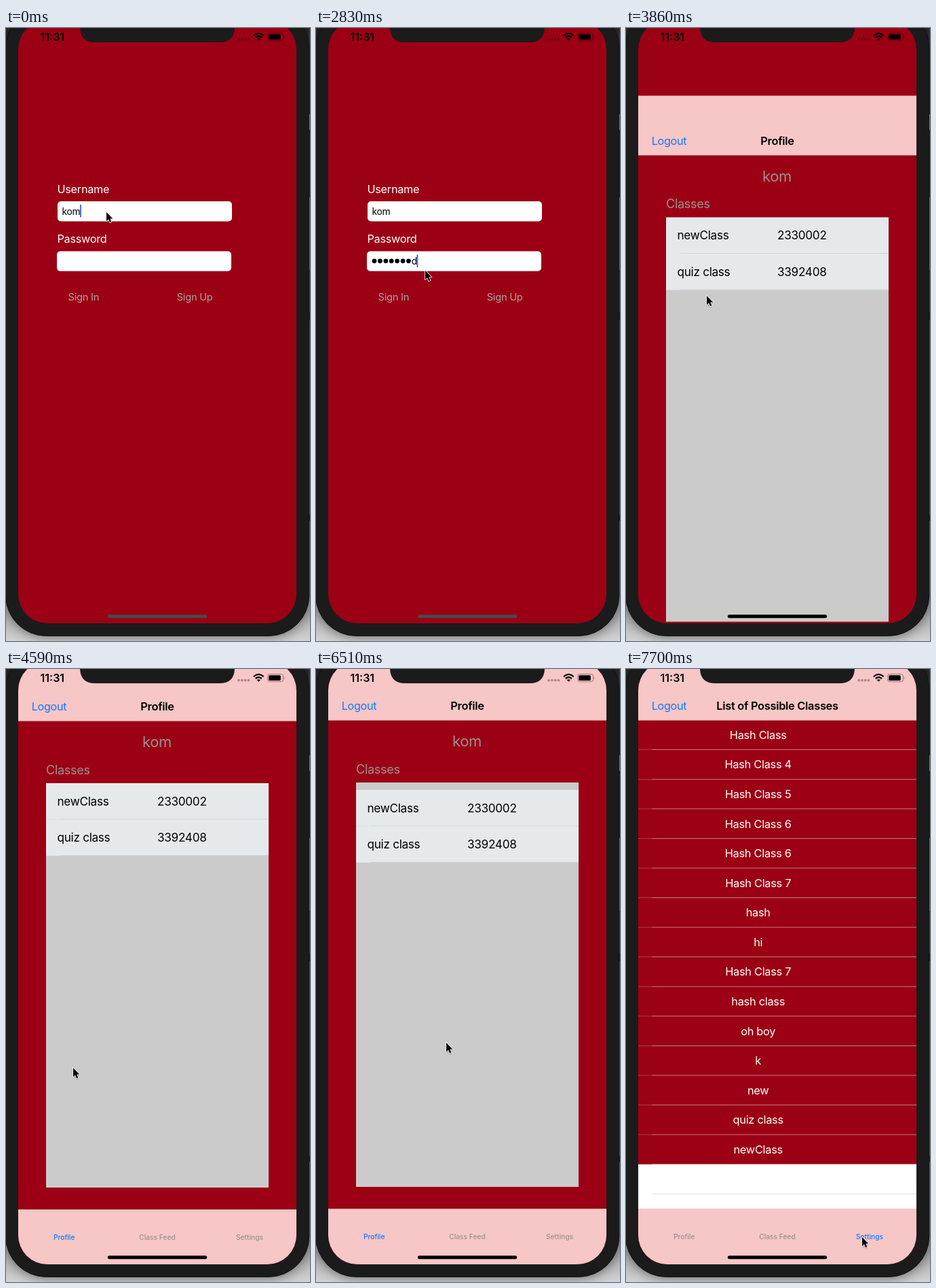
An HTML page for the animation above (8 s loop, 448 px wide and 902 px high).

```html
<!DOCTYPE html>
<html lang="en">
<head>
<meta charset="utf-8">
<title>Sign-in walkthrough</title>
<style>
html, body { margin: 0; width: 100%; height: 100%; overflow: hidden; background: #2b2b2b; }
svg { display: block; width: 100vw; height: 100vh; }
text { font-family: Inter, "Liberation Sans", sans-serif; letter-spacing: -.018em; white-space: pre; }
.label { font-size: 16.3px; fill: #fff; }
.button { font-size: 14.7px; fill: #ada3a4; }
.field { font-size: 13.8px; fill: #000; }
.link { font-size: 16.2px; fill: #0b7bff; }
.title { font-size: 16.4px; font-weight: 600; text-anchor: middle; }
.name { font-size: 22px; fill: #9a9091; text-anchor: middle; }
.head { font-size: 18.1px; fill: #9a9091; }
.cell { font-size: 17.2px; }
.row { font-size: 16.4px; fill: #fff; text-anchor: middle; }
.tab { font-size: 10.2px; font-weight: 500; fill: #9c9091; letter-spacing: 0; text-anchor: middle; }
.tab.on { fill: #0b7bff; }
.clock { font-size: 16px; font-weight: 600; letter-spacing: 0; }
</style>
</head>
<body>
<svg viewBox="0 0 448 902" xmlns="http://www.w3.org/2000/svg">
  <defs>
    <linearGradient id="desk" x1="0" y1="0" x2="0" y2="1">
      <stop offset="0" stop-color="#2b2b2b"/><stop offset=".8" stop-color="#3a3a3a"/>
      <stop offset=".93" stop-color="#9a9a9a"/><stop offset="1" stop-color="#d2d2d2"/>
    </linearGradient>
    <filter id="blur" x="-20%" y="-20%" width="140%" height="140%"><feGaussianBlur stdDeviation="9"/></filter>
    <filter id="soft" x="-60%" y="-60%" width="220%" height="220%"><feGaussianBlur stdDeviation="1"/></filter>
    <clipPath id="screen"><rect x="18" y="-11.6" width="410" height="887.6" rx="43"/></clipPath>
    <clipPath id="tableBox"><rect x="59" y="167" width="328" height="595"/></clipPath>
    <path id="arrow" d="M0 0V13.2L3 10.4L5.1 15.3L7.4 14.3L5.3 9.5H9.4Z"/>
  </defs>

  <rect width="448" height="902" fill="url(#desk)"/>
  <rect x="0" y="-30" width="447" height="926" rx="60" opacity=".5" filter="url(#blur)"/>
  <g id="edge"></g>
  <rect x="-.5" y="-30" width="447.3" height="924.5" rx="60" fill="#1b1b1b" stroke="#111"/>

  <g clip-path="url(#screen)">
    <rect x="18" y="-12" width="410" height="888" fill="#9b0014"/>
    <g id="login">
      <text class="label" x="75.5" y="242.5">Username</text>
      <rect x="76" y="255" width="257" height="29.5" rx="5" fill="#fff"/>
      <text class="field" id="user" x="82.5" y="274.5">kom</text>
      <text class="label" x="75.5" y="316">Password</text>
      <rect x="75" y="328.5" width="257" height="29.3" rx="5" fill="#fff"/>
      <g id="bullets"></g>
      <text class="field" id="lastChar" y="347.8"></text>
      <rect id="caret" width="1.8" height="18.5" fill="#3f60d8"/>
      <text class="button" x="91.5" y="401">Sign In</text>
      <text class="button" x="251.7" y="401">Sign Up</text>
    </g>
    <g id="sheet">
      <rect x="18" y="-12" width="410" height="900" fill="#9b0014"/>
      <g id="profile">
        <text class="name" x="222.5" y="114">kom</text>
        <text class="head" x="59" y="153.8">Classes</text>
        <rect x="59" y="167" width="328" height="595" fill="#cbcbcb"/>
        <g clip-path="url(#tableBox)"><g id="cells"></g></g>
      </g>
      <g id="list"></g>
      <rect x="18" y="-12" width="410" height="87.5" fill="#f7c6c6"/>
      <path d="M18 75.6H428" stroke="#c9a3a5" stroke-width=".6"/>
      <text class="link" x="37.7" y="60">Logout</text>
      <text class="title" id="title" x="223" y="60"></text>
      <rect x="18" y="794" width="410" height="94" fill="#f7c6c6"/>
      <path id="tabLine" d="M18 793.8H428" stroke="#7d1420" stroke-width=".8"/>
      <g id="tabs"></g>
    </g>
  </g>

  <path d="M103 -3Q109 -2 109 0Q110 21 131 21H315Q336 21 337 0Q337 -2 343 -3Z" fill="#1b1b1b"/>
  <text class="clock" x="50.5" y="18.7">11:31</text>
  <g id="signal" opacity=".3"></g>
  <g fill="none" stroke="#000" stroke-width="2.2">
    <path d="M364.9 11.3Q372.3 4.6 379.7 11.3"/>
    <path d="M367.7 14.2Q372.3 10.2 376.9 14.2"/>
  </g>
  <path d="M369.7 16.1Q372.3 14.2 374.9 16.1L372.3 18.8Z"/>
  <rect x="385.6" y="7.6" width="23" height="11" rx="3" fill="none" stroke="#000" stroke-opacity=".4"/>
  <rect x="387.2" y="9.2" width="17.6" height="7.8" rx="1.6"/>
  <path d="M409.8 11.2Q411.6 13.1 409.8 15Z" opacity=".45"/>
  <rect id="home" x="149.8" y="863.2" width="146.4" height="5" rx="2.5"/>

  <g id="cursor">
    <use href="#arrow" y="1.5" opacity=".45" filter="url(#soft)"/>
    <use href="#arrow" fill="#000" stroke="#fff" stroke-width="1.6" stroke-linejoin="round" paint-order="stroke"/>
  </g>
</svg>
<script>
const LOOP = 8000;
const $ = id => document.getElementById(id);
const atLeast = (low, v) => v < low ? low : v;
const move = (el, x, y) => el.setAttribute('transform', `translate(${x} ${y})`);
const show = (el, on) => el.setAttribute('visibility', on ? 'inherit' : 'hidden');
const rect = (x, y, w, h, fill) => `<rect x="${x}" y="${y}" width="${w}" height="${h}" fill="${fill}"/>`;
const label = (cls, x, y, s) => `<text class="${cls}" x="${x}" y="${y}">${s}</text>`;

// Slivers of the desktop window beside the phone: top, height, colour
$('edge').innerHTML = [
  [0, 127, '#303030'], [127, 23, '#a8a8a8'], [150, 99, '#333'], [249, 107, '#8a8a8a'],
  [356, 62, '#555'], [418, 12, '#2c2c2c'], [430, 286, '#666'], [716, 9, '#2e2e2e'], [725, 115, '#777']
].map(([y, h, c]) => rect(446, y, 2, h, c)).join('');

$('signal').innerHTML = [0, 1, 2, 3].map(i =>
  `<circle cx="${343 + i * 4.8}" cy="16.6" r="1.9"/>`).join('');

const ROW = 53.4;
$('cells').innerHTML = [['newClass', '2330002'], ['quiz class', '3392408']].map(([name, code], i) => {
  const y = 167 + i * ROW;
  return rect(59, y, 328, ROW, '#e5e9ec') + rect(80, y + ROW - .8, 307, .8, '#c9cccf') +
    label('cell', 75.5, y + 32.7, name) + label('cell', 223, y + 32.7, code);
}).join('');

const classes = ['Hash Class', 'Hash Class 4', 'Hash Class 5', 'Hash Class 6', 'Hash Class 6',
  'Hash Class 7', 'hash', 'hi', 'Hash Class 7', 'hash class', 'oh boy', 'k', 'new', 'quiz class', 'newClass'];
const LINE = 43.57;
$('list').innerHTML = rect(18, 729, 410, 65, '#fff') + classes.map((name, i) => {
  const end = 75.5 + (i + 1) * LINE;
  return rect(18, end - .7, 20, .7, '#b5545f') + rect(38, end - .8, 390, .8, '#cd9a9f') +
    label('row', 194.7, end - 16.2, name);
}).join('') + rect(38, 772, 390, .8, '#dadada');

$('tabs').innerHTML = label('tab', 85.7, 839, 'Profile') +
  label('tab', 223, 839, 'Class Feed') + label('tab', 359, 839, 'Settings');
const tabs = [...$('tabs').children];

const bursts = [[0, 0, 1], [300, 890, 5], [1490, 2530, 8], [2830, 3860, 8], [4010, 4590, 5],
  [4890, 5330, 4], [5770, 6800, 8], [6950, 7400, 4], [7700, 7700, 1]];
const ticks = bursts.flatMap(([from, to, n]) => Array.from({ length: n }, (_, i) =>
  Math.floor((from + (to - from) * i / atLeast(1, n - 1) + 1) / 10) * 10));
const held = t => ticks.filter(k => k <= t).pop();

// Linear interpolation over [time, ...values] keys
function along(keys, t) {
  const i = keys.findIndex(k => k[0] > t);
  if (i < 0) return keys[keys.length - 1].slice(1);
  if (i === 0) return keys[0].slice(1);
  const a = keys[i - 1], b = keys[i], p = (t - a[0]) / (b[0] - a[0]);
  return a.slice(1).map((v, j) => v + (b[j + 1] - v) * p);
}

const pointer = [[200, 148, 271], [740, 167, 340], [2690, 167, 340], [2830, 161, 357],
  [3120, 122, 391], [3270, 119, 394], [3900, 119, 394], [4590, 99, 587], [4750, 99, 587],
  [5330, 165, 398], [5620, 165, 398], [6060, 166, 417], [6210, 168, 450], [6360, 172, 480],
  [6500, 192, 550], [6650, 240, 700], [6800, 290, 846], [6950, 328, 857], [7100, 344, 846], [7400, 348, 836]];
const pull = [[5770, 0], [6060, 4], [6210, 14], [6360, 22], [6500, 11], [6650, 5], [6800, 2], [6950, 1], [7100, 0]];

const SECRET = 'password', STEP = 8.4;

// Critically damped spring
function sheetOffset(t) {
  const x = atLeast(0, t - 3660) * .018;
  const y = 888 * (1 + x) * Math.exp(-x);
  return t < 4890 ? atLeast(1, y) : 0;
}

function drawLogin(t) {
  const typed = Math.min(SECRET.length, ticks.filter(k => k >= 1490 && k <= t).length);
  const dots = atLeast(0, typed - 1);
  $('bullets').innerHTML = Array.from({ length: dots }, (_, i) =>
    `<circle cx="${86 + i * STEP}" cy="342.8" r="3.4"/>`).join('');
  const last = $('lastChar');
  last.textContent = typed ? SECRET[typed - 1] : '';
  last.setAttribute('x', 82 + dots * STEP);
  const inUser = t < 740;
  const x = inUser ? 82.2 + $('user').getComputedTextLength()
    : 81.5 + dots * STEP + (typed ? last.getComputedTextLength() : 0);
  $('caret').setAttribute('x', x);
  $('caret').setAttribute('y', inUser ? 260 : 333.5);
}

function draw(now) {
  const t = held(now % LOOP);
  const listed = t >= 7700;
  drawLogin(t);
  move($('sheet'), 0, sheetOffset(t));
  move($('cells'), 0, along(pull, t)[0]);
  show($('profile'), !listed);
  show($('list'), listed);
  show($('tabLine'), !listed);
  $('title').textContent = listed ? 'List of Possible Classes' : 'Profile';
  tabs.forEach((tab, i) => tab.classList.toggle('on', i === (listed ? 2 : 0)));
  $('home').setAttribute('fill', t < 3660 ? '#4b484a' : '#000');
  move($('cursor'), ...along(pointer, t));
}

const start = performance.now();
function loop() {
  draw(performance.now() - start);
  requestAnimationFrame(loop);
}
loop();
</script>
</body>
</html>
```
